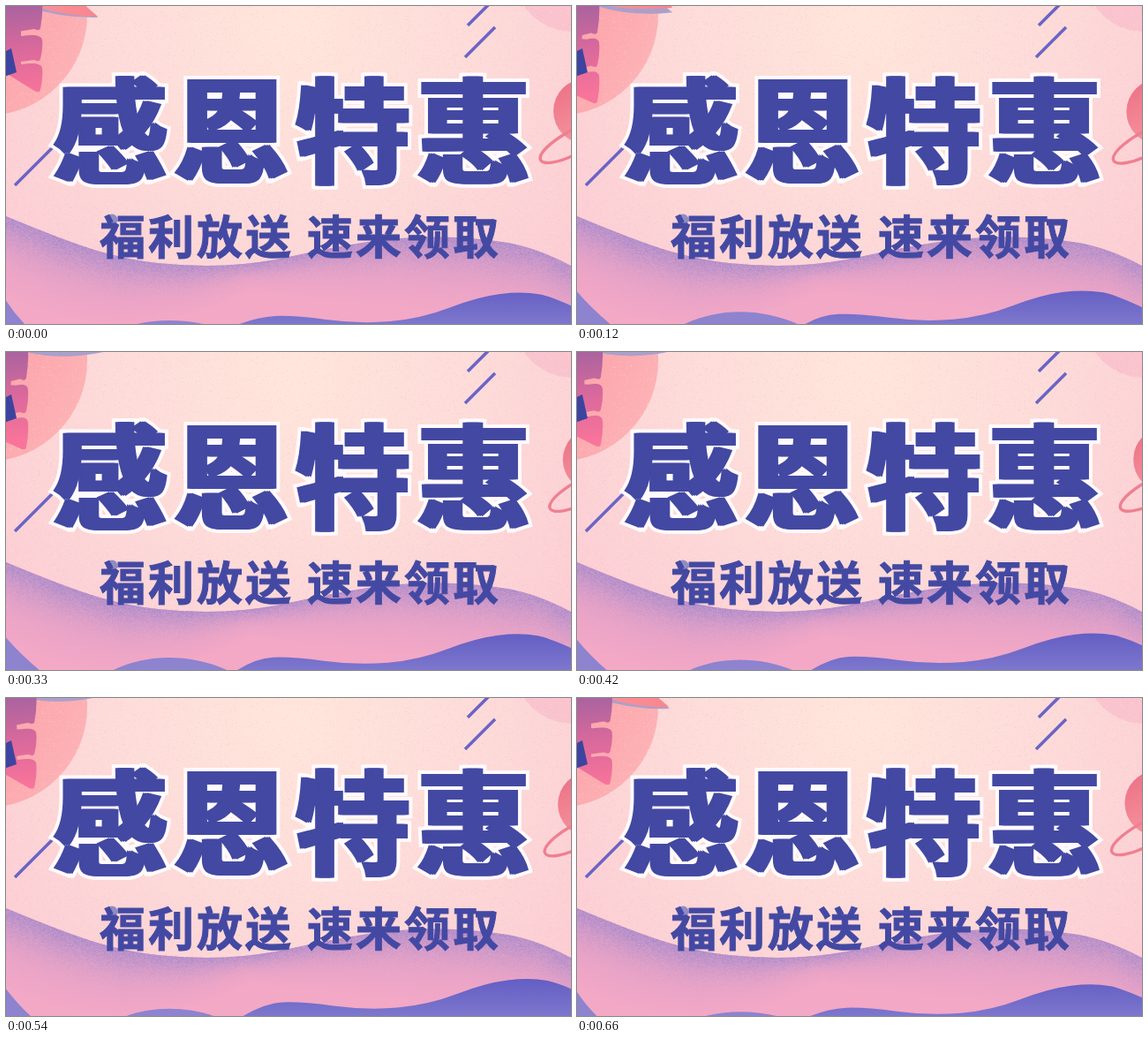
Recreate the animation shown at these times as an HTML page with a canvas. Size 640 px wide and 360 px high, loop 690 ms.

```html
<!DOCTYPE html>
<html lang="zh-CN">
<head>
<meta charset="utf-8">
<style>
  html, body { margin: 0; width: 100%; height: 100%; overflow: hidden; background: #fcd8d6; }
  canvas { display: block; }
</style>
</head>
<body>
<canvas id="stage" width="640" height="360"></canvas>
<script>
const W = 640, H = 360, LOOP = 690, STEP = 30;
const FONT = '"Noto Sans CJK SC", "Noto Sans CJK", sans-serif';
const INDIGO = '#4349a2', VIOLET = '#6b64c6', CORAL = '#f07f90', LAVENDER = '#8d83cf';
const ctx = document.getElementById('stage').getContext('2d');

function layer(paint) {
  const canvas = document.createElement('canvas');
  canvas.width = W;
  canvas.height = H;
  paint(canvas.getContext('2d'));
  return canvas;
}

function randomizer(seed) {
  return () => (seed = (seed * 16807) % 2147483647) / 2147483647;
}

function linear(c, x0, y0, x1, y1, ...colors) {
  const g = c.createLinearGradient(x0, y0, x1, y1);
  colors.forEach((color, i) => g.addColorStop(i / (colors.length - 1), color));
  return g;
}

function disc(c, x, y, r, fill) {
  c.fillStyle = fill;
  c.beginPath();
  c.arc(x, y, r, 0, Math.PI * 2);
  c.fill();
}

function line(c, x0, y0, x1, y1) {
  c.strokeStyle = VIOLET;
  c.lineWidth = 3.6;
  c.beginPath();
  c.moveTo(x0, y0);
  c.lineTo(x1, y1);
  c.stroke();
}

// Smooth curve guided by the given points.
function smooth(c, pts) {
  c.moveTo(...pts[0]);
  for (let i = 1; i < pts.length - 1; i++) {
    const [x, y] = pts[i], [nx, ny] = pts[i + 1];
    const last = i === pts.length - 2;
    c.quadraticCurveTo(x, y, last ? nx : (x + nx) / 2, last ? ny : (y + ny) / 2);
  }
}

const ridge = [[0, 238], [65, 265], [135, 287], [210, 295], [285, 292], [370, 273],
  [450, 261], [530, 262], [600, 273], [640, 294]];

function paintHill(c) {
  c.beginPath();
  smooth(c, ridge);
  c.lineTo(W, H);
  c.lineTo(0, H);
  c.closePath();
  c.fillStyle = '#f3a8c6';
  c.fill();
  c.save();
  c.clip();

  const rand = randomizer(71);
  const crest = x => {
    const i = Math.max(0, ridge.findIndex(p => p[0] > x) - 1);
    const [x0, y0] = ridge[i], [x1, y1] = ridge[i + 1];
    return y0 + (y1 - y0) * (x - x0) / (x1 - x0);
  };
  c.fillStyle = '#9684cd';
  for (let x = 0; x < W; x++) {
    const top = Math.floor(crest(x)) - 3;
    const reach = 13 + 24 * Math.abs(Math.cos(Math.PI * x / 560));
    for (let y = top; y < top + reach * 2.5; y++) {
      const shade = Math.exp(-(((y - top) / reach) ** 1.4));
      c.globalAlpha = Math.max(0, shade) * (0.45 + 0.45 * rand());
      c.fillRect(x, y, 1, 1);
    }
  }
  c.restore();
}

const backdrop = layer(c => {
  const glow = c.createRadialGradient(325, 20, 20, 325, 20, 400);
  glow.addColorStop(0, '#ffe5db');
  glow.addColorStop(0.5, '#fddbd9');
  glow.addColorStop(1, '#fcced4');
  c.fillStyle = glow;
  c.fillRect(0, 0, W, H);

  disc(c, 642, -38, 67, '#fac4ce');
  disc(c, -22, 10, 114, linear(c, 0, 0, 90, 40, '#fca3aa', '#fdb2b5'));

  const rand = randomizer(19);
  for (let i = 0; i < 16000; i++) {
    c.fillStyle = i % 2 ? 'rgba(255,240,235,.22)' : 'rgba(236,140,160,.13)';
    c.fillRect(Math.floor(rand() * W), Math.floor(rand() * 300), 1, 1);
  }

  line(c, 523, 22, 548, -3);
  line(c, 520, 58, 554, 24);
  line(c, 10, 203, 72, 141);
  paintHill(c);
  disc(c, 120, 242, 6.5, '#918bc4');
});

const lettering = layer(c => {
  c.textAlign = 'center';
  c.lineJoin = 'miter';
  c.miterLimit = 3;
  const write = (chars, x, y, pitch, outline) => {
    c.lineWidth = outline;
    [...chars].forEach((ch, i) => {
      c.strokeText(ch, x + i * pitch, y);
      c.fillText(ch, x + i * pitch, y);
    });
  };
  const ink = color => c.fillStyle = c.strokeStyle = color;

  // Sideways copies make the upright strokes heavier than the level ones.
  const title = outline => [-2.5, 0, 2.5].forEach(dx =>
    write('感恩特惠', 118 + dx, 190.5, 137.3, outline));
  c.font = `900 129px ${FONT}`;
  ink('#fffafb');
  title(10);
  ink(INDIGO);
  title(2);

  c.font = `700 52px ${FONT}`;
  write('福利放送', 132, 281, 55, 1);
  write('速来领取', 367, 281, 55, 1);
});

// Quick swing out, steady return.
const sway = t => t < 220 ? Math.sin(Math.PI / 2 * t / 220) : 1 - (t - 220) / 470;
// Slow rise, rapid fall.
const lift = t => t < 550 ? Math.sin(Math.PI / 2 * t / 550) : ((LOOP - t) / 140) ** 2;
const drift = t => (1 - Math.cos(2 * Math.PI * (t - 15) / LOOP)) / 2;

function drawLeaf(s) {
  const edge = 41 - 21 * s;
  const lobe = (top, bottom, innerBottom) => {
    ctx.beginPath();
    ctx.moveTo(-5, top);
    ctx.lineTo(edge * 0.45, top + 1);
    ctx.bezierCurveTo(edge * 0.75, top - 1, edge, top, edge, top + 6);
    ctx.quadraticCurveTo(edge + 1, (top + bottom) / 2, edge - 2, bottom - 3);
    ctx.quadraticCurveTo(edge - 3, bottom + 1, edge - 9, bottom - 2);
    ctx.lineTo(-5, innerBottom);
    ctx.fill();
  };
  ctx.fillStyle = linear(ctx, 0, 0, 6, 100, '#a9639f', '#da699c', '#f8749a');
  ctx.fillRect(-5, -5, 22 - 15 * s, 80);
  lobe(-10, 28 + 6 * s, 32 + 5 * s);
  lobe(33 + 5 * s, 63 + 9 * s, 66 + 8 * s);
  lobe(65 + 12 * s, 98 + 17 * s, 73 + 35 * s);

  ctx.fillStyle = '#3d449f';
  ctx.beginPath();
  ctx.moveTo(-2, 52);
  ctx.lineTo(6, 48);
  ctx.lineTo(12, 75);
  ctx.lineTo(-2, 80);
  ctx.fill();
}

function drawBrim(l) {
  const blade = (left, dip, tipX, tipY, right, fill) => {
    ctx.fillStyle = fill;
    ctx.beginPath();
    ctx.moveTo(left, -2);
    ctx.quadraticCurveTo(60, dip, tipX, tipY);
    ctx.lineTo(right, -2);
    ctx.fill();
  };
  const k = l * 2.5;
  blade(15, 14 - 3 * l, 104 + 12 * l, 13 - 17 * l, 88 + 26 * l, '#aaa0cb');
  blade(28, 11 - 6 * k, 104 + 5 * k, 12 - 12 * k, 88 + 20 * k,
    linear(ctx, 30, 0, 104, 0, '#fb9297', '#f9858e'));
}

function drawPlanet(d) {
  ctx.save();
  ctx.translate(11 * d, 3 * d);
  disc(ctx, 657, 119, 37, linear(ctx, 622, 95, 646, 145, '#ed7488', '#f58f9a'));
  ctx.strokeStyle = CORAL;
  ctx.lineWidth = 3.4;
  ctx.beginPath();
  ctx.moveTo(650, 136);
  ctx.bezierCurveTo(622, 149, 604, 165, 605, 173);
  ctx.bezierCurveTo(607, 181, 628, 178, 650, 165);
  ctx.stroke();
  ctx.restore();
}

function drawWaves(s, l) {
  const base = 361, half = 42 + 32 * s;
  const control = base - (5 + 13 * s) / 0.75;
  ctx.fillStyle = LAVENDER;
  ctx.beginPath();
  ctx.moveTo(186 - half, base);
  ctx.bezierCurveTo(186 - half * 0.4, control, 186 + half * 0.35, control, 186 + half, base);
  ctx.fill();

  ctx.beginPath();
  ctx.moveTo(-1, 332 - 13 * s);
  ctx.quadraticCurveTo(9 + 9 * s, 348 - 8 * s, 22 + 22 * s, base);
  ctx.lineTo(-1, base);
  ctx.fill();

  const dx = 14 * l - 18 * s, dy = -6.5 * l;
  const wave = [[262, 361], [285, 352], [325, 350], [400, 360], [470, 354],
    [535, 329], [585, 323], [625, 330], [700, 368]];
  ctx.fillStyle = linear(ctx, 0, 320, 0, 372, '#645fc4', '#857ed0');
  ctx.beginPath();
  smooth(ctx, wave.map(([x, y], i) => [x + dx * (i ? 1 : 0.6), y + (i ? dy : 0)]));
  ctx.lineTo(720, 372);
  ctx.lineTo(250, 372);
  ctx.fill();
}

function frame() {
  const t = Math.floor(performance.now() % LOOP / STEP) * STEP;
  const s = sway(t), l = lift(t);
  ctx.drawImage(backdrop, 0, 0);
  drawBrim(l);
  drawLeaf(s);
  drawPlanet(drift(t));
  drawWaves(s, l);
  ctx.drawImage(lettering, 0, 0);
  requestAnimationFrame(frame);
}
frame();
</script>
</body>
</html>
```
